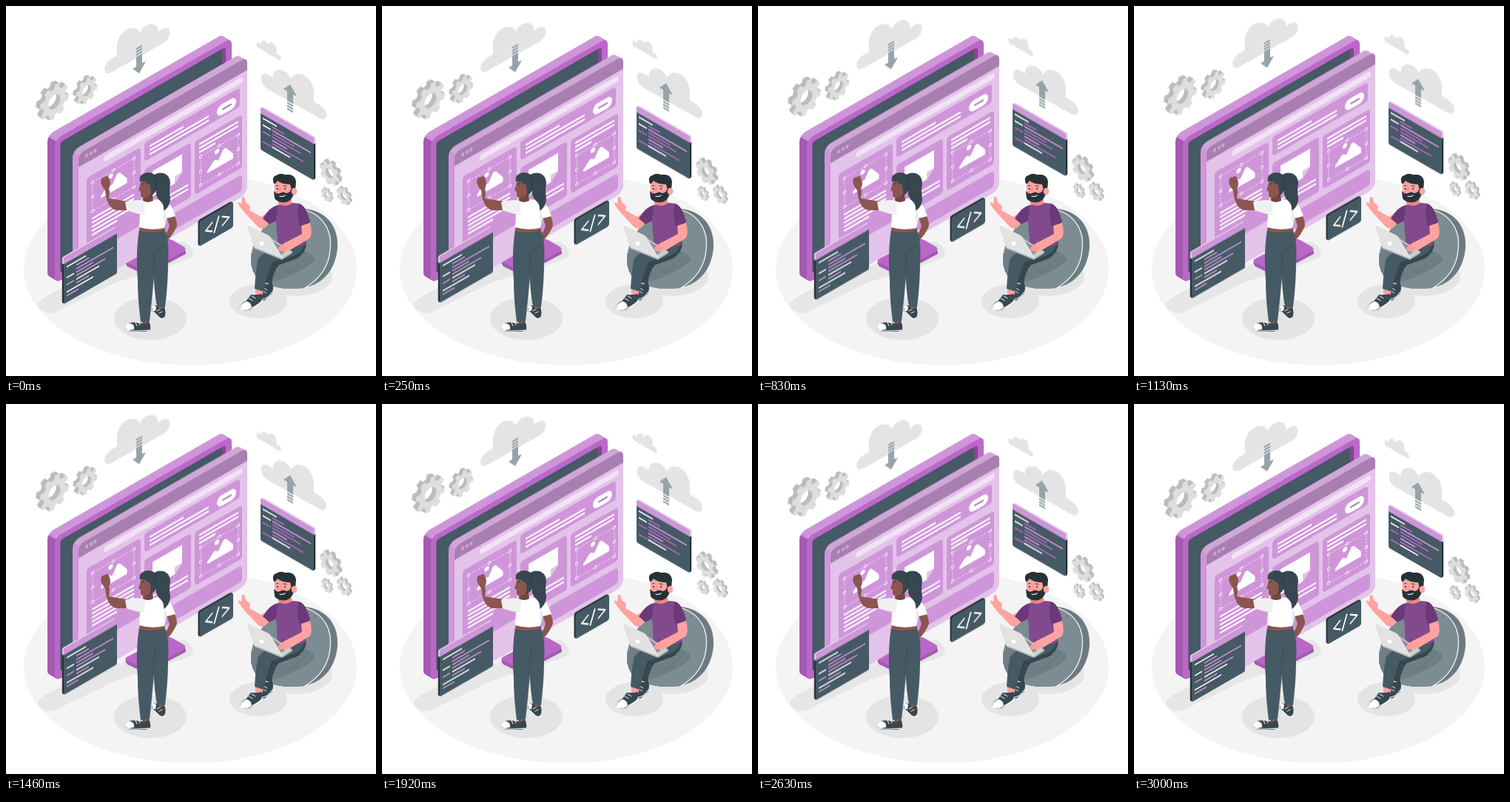
Animation of 500 by 500 pixels, one loop 3.04 s. Source, as an HTML page:

```html
<!DOCTYPE html>
<html lang="en">
<head>
<meta charset="utf-8">
<title>Web design team</title>
<style>
  html, body { margin: 0; width: 100%; height: 100%; overflow: hidden; background: #fff; }
  svg { display: block; width: 100%; height: 100%; }
</style>
</head>
<body>
<svg id="stage" viewBox="0 0 500 500"></svg>
<script>
const C = {
  purple: '#ba68c8', deep: '#a45ab0', lilac: '#cf95d9', pale: '#e3c3e9',
  slate: '#455a64', ink: '#263238', night: '#37474f', bar: '#a97fb1',
  cloud: '#e4e4e4', arrow: '#98a3a8', brown: '#8b5650', dusk: '#74463f',
  skin: '#ffa3a0', shirt: '#82498c'
};
const SLOPE = 0.577;

const path = (d, fill, extra = '') => `<path d="${d}" fill="${fill}" ${extra}/>`;
const line = (d, stroke, w = 1, extra = '') =>
  `<path d="${d}" fill="none" stroke="${stroke}" stroke-width="${w}" stroke-linecap="round" stroke-linejoin="round" ${extra}/>`;
const box = (x, y, x2, y2, r, fill, extra = '') =>
  `<rect x="${x}" y="${y}" width="${x2 - x}" height="${y2 - y}" rx="${r}" fill="${fill}" ${extra}/>`;
const oval = (x, y, rx, ry, fill) =>
  `<ellipse cx="${x}" cy="${y}" rx="${rx}" ry="${ry}" fill="${fill}"/>`;
const move = (x, y, body) => `<g transform="translate(${x} ${y})">${body}</g>`;
const bob = body => `<g class="bob">${body}</g>`;

// Upright isometric wall: up = -1 rises to the right, up = 1 falls.
const wall = (x, y, up, body) => `<g transform="matrix(1 ${up * SLOPE} 0 1 ${x} ${y})">${body}</g>`;

// Repeats a shape along a depth vector to make its sides.
function extrude(body, dx, dy, steps = 8) {
  let out = '';
  for (let i = steps; i > 0; i--) out += move(dx * i / steps, dy * i / steps, body);
  return out;
}

const edgeFill = (id, y, top, side) =>
  `<linearGradient id="${id}" gradientUnits="userSpaceOnUse" x1="0" y1="${y}" x2="0" y2="${y + 1}">
    <stop offset="0" stop-color="${top}"/><stop offset="1" stop-color="${side}"/></linearGradient>`;

const defs = `<defs>${edgeFill('screenEdge', 184, C.lilac, C.deep)}${edgeFill('pageEdge', 204, '#d0a6d7', C.lilac)}${edgeFill('panelEdge', 8, C.pale, C.ink)}</defs>`;

/* Floor */
const floor = oval(249, 355.5, 225, 130, '#f4f4f4')
  + path('M44 401Q46 396 76 381L238 318Q252 324 253 334Q253 340 244 343L150 373 66 414Q53 418 44 408Z', '#e6e6e6')
  + oval(195, 422.5, 49, 29, '#e4e4e4') + oval(341, 399, 39, 23, '#e4e4e4')
  + oval(392, 365, 49, 27, '#e4e4e4');

/* Sky */
const cloudShape = path('M137 91C130 89 132 76 147 69C150 67 151 66 150 62C148 47 156 32 168 30C175 29 179 32 181 36C184 28 193 22 200 25C205 27 206 32 205 36C211 29 220 27 221 33C223 41 217 48 211 51L145 88C142 90 139 91 137 91Z', C.cloud);
const arrowShape = path('M176 69 184 64.5V77L189 75 180 91 171 85 176 82Z', C.arrow)
  + [55, 59, 63].map(y => path(`M176 ${y + 2}l8-4.5v2.5l-8 4.5z`, C.arrow)).join('');
const sky = cloudShape + arrowShape
  + `<g transform="matrix(-1 0 0 1 566 62)">${cloudShape}</g>`
  + `<g transform="matrix(-.38 0 0 .39 422.5 37.6)">${cloudShape}</g>`
  + `<g transform="matrix(1 0 0 -1 204 197)">${arrowShape}</g>`;

/* Gears */
function gearPath(r) {
  const teeth = 8, step = 2 * Math.PI / teeth, pts = [];
  const at = (a, k) => `${(Math.cos(a) * r * k).toFixed(2)} ${(Math.sin(a) * r * k).toFixed(2)}`;
  for (let i = 0; i < teeth; i++) {
    const a = i * step + 0.2;
    pts.push(at(a - .25, .76), at(a - .16, 1), at(a + .16, 1), at(a + .25, .76));
  }
  const h = r * .4;
  return `M${pts.join('L')}ZM${h} 0A${h} ${h} 0 1 0 ${-h} 0A${h} ${h} 0 1 0 ${h} 0Z`;
}
function gear(x, y, r, up, depth) {
  const shape = fill => `<g transform="matrix(.866 ${up * .5} 0 1 ${x} ${y})">${path(gearPath(r), fill, 'fill-rule="evenodd"')}</g>`;
  return extrude(shape('#bcbcbc'), up * depth, -depth * SLOPE) + shape('#dedede');
}
const gears = gear(65.5, 129.5, 23, -1, 5.5) + gear(109, 114.5, 17, -1, 4)
  + gear(437, 226, 15.5, 1, 4) + gear(433, 255.5, 8.5, 1, 2) + gear(456, 257, 11, 1, 2.5);

/* Monitor */
const stand = path('M161 347L213 318Q219 314 225 318L240 327Q243 329 243 335L194 361Q188 363 183 361L164 352Z', C.deep)
  + path('M163 342L212 316Q219 313 226 317L240 325Q245 328 240 332L194 356Q189 358 184 356L164 347Q159 345 163 342Z', C.purple);
const slab = fill => wall(66, 0, -1, box(0, 180.7, 239, 375, 8, fill));
const monitor = stand + extrude(slab('url(#screenEdge)'), -10, -6, 10) + slab(C.purple)
  + wall(66, 0, -1, box(7.5, 188.5, 231, 366, 4, C.shirt) + box(7.5, 188.5, 226, 366, 4, C.slate));

/* Web page */
function picture(x, y, w) {
  const h = 39, dx = (w - 51) / 2;
  const knobs = [[0, 0], [w / 2, 0], [w, 0], [0, h], [w / 2, h], [w, h], [0, h / 2], [w, h / 2]];
  return move(x, y, `<rect width="${w}" height="${h}" fill="none" stroke="#fff" stroke-width=".6" stroke-dasharray="2.4 1.8"/>`
    + knobs.map(([a, b]) => box(a - 1.5, b - 1.5, a + 1.5, b + 1.5, 0, C.lilac, 'stroke="#fff" stroke-width=".7"')).join('')
    + move(dx, 0, path('M9 28V25L17 17Q19 15 21 17L24 19 30 9Q32 6.5 34.5 8.5L43 20Q44 21 44 23V28Z', '#fff') + oval(22, 6, 3.1, 3.1, '#fff')));
}
const texts = rows => rows.map(([x, x2, y]) => box(x, y - 1.2, x2, y + 1.2, 0, '#fff')).join('');
const sheet = fill => wall(98, 0, -1, box(0, 200, 228, 385, 9, fill));
const page = extrude(sheet('url(#pageEdge)'), -8, -4.6) + sheet(C.pale)
  + wall(98, 0, -1,
    path('M0 218V209Q0 200 9 200H219Q228 200 228 209V218Z', C.bar)
    + [11, 17, 22.5].map(x => oval(x, 208.6, 2.1, 2.4, '#cda9d4')).join('')
    + box(34, 223, 222, 231, 4, '#f2e2f5')
    + box(11, 239, 84, 345, 4, C.lilac) + picture(19, 249, 56)
    + texts([[18, 75, 298], [18, 75, 303.5], [18, 75, 309], [18, 75, 314.5], [18, 52, 320]])
    + box(89, 236, 218, 262, 4, C.lilac) + texts([[96, 142, 245], [96, 176, 250.5], [96, 176, 256]])
    + box(187, 244.5, 213, 259, 7, '#fff') + box(194, 250.7, 207, 253, 1, C.bar)
    + box(89, 272, 152, 346, 4, C.lilac)
    + path('M100 281H140V305L130 315H100Z', '#fff') + path('M140 305H130V315Z', C.pale)
    + texts([[96, 148, 327], [96, 148, 333]])
    + box(157, 274, 221, 346, 4, C.lilac)
    + texts([[163, 216, 281], [163, 216, 286.5], [163, 185, 292]]) + picture(165, 298.5, 51)
    + box(89, 355, 221, 377, 5, C.lilac));

/* Code panels */
const W = '#fff', P = C.purple, L = C.lilac;
const code = rows => rows.map(([c, x, x2, y]) => box(x, y - .9, x2, y + .9, 0, c)).join('');
function panel(x, y, up, h, rows) {
  const plate = fill => wall(x, y, up, box(0, 0, 72, h, 2, fill));
  return extrude(plate('url(#panelEdge)'), up * 2.2, -1.3, 4) + plate(C.slate)
    + wall(x, y, up, path('M0 8V2Q0 0 2 0H70Q72 0 72 2V8Z', L) + code(rows));
}
const panels = panel(344, 137, 1, 57, [
    [W, 3, 22, 13], [P, 16, 32, 17.5], [L, 16, 68, 22], [W, 3, 14, 22], [P, 16, 46, 26.5],
    [P, 3, 14, 31], [P, 16, 54, 31], [L, 16, 36, 35.5], [P, 16, 58, 40], [P, 3, 18, 44.5], [W, 16, 40, 44.5]])
  + panel(78, 341, -1, 62, [
    [W, 4, 30, 14], [L, 17, 34, 19], [L, 17, 67, 24], [W, 4, 14, 28.5], [L, 17, 40, 28.5],
    [L, 17, 56, 33], [L, 4, 14, 38], [W, 17, 48, 38], [L, 17, 34, 43], [W, 4, 40, 48], [L, 4, 20, 53]]);

const tagPlate = fill => wall(261.5, 291, -1, box(0, 0, 45.5, 34, 2.5, fill));
const tag = extrude(tagPlate(C.ink), -2, -1.2, 4) + tagPlate(C.slate)
  + wall(261.5, 291.5, -1, line('M17 11 8.5 17 17 23M26 8 20 26M31 11 40 17 31 23', '#fff', 2));

/* Woman */
const woman =
  // far arm
  path('M215 280L225 279Q231 288 231 297Q227 307 219 316L212 321 209 314 218 305 221 297Z', C.brown)
  // legs
  + path('M184 425H193V431H184ZM205 402H214V411H205Z', C.brown)
  + path('M198 302L214 301C220 315 220 330 219 347C219 370 217 390 215 407L204 406C201 390 200 375 199 355Z', C.slate)
  + path('M180 302C177 320 176 345 178 370C178 392 180 410 182 427L194 426C197 400 199 378 201 352L210 330 214 301Z', C.slate)
  + line('M199 358L201 331Q209 330 214 322', C.night, .8)
  // shoes
  + path('M197 406Q201 403 205 406L208 410 214 407Q217 415 214 421Q211 425 207 421L197 412Z', C.night)
  + path('M197 406Q201 403 203 407L202 412 198 412Z', '#fff')
  + line('M198 412L207 421Q211 424 214 421', '#fff', 1.1) + line('M204 412l4-2M207 415l4-2', '#fff', .9)
  + path('M162 431Q168 426 177 428L184 429Q189 431 193 426Q196 432 195 438L188 440H172Q161 440 161 434Z', C.night)
  + path('M161 434Q162 428 169 429Q174 431 173 437L166 438Q161 438 161 434Z', '#fff')
  + line('M163 438Q170 440 194 438', '#fff', 1.2) + line('M175 428l2 4M179 427l2 4', '#fff', 1)
  // torso
  + path('M181 296H214L215 303Q198 309 180 304Z', C.brown)
  + path('M184 263Q195 260 208 262Q223 266 225 274L229 284 217 287 214 300Q197 304 180 299L181 280Z', '#fff')
  + path('M216 276L217 287 215 295Q211 286 216 276Z', '#e8e8e8')
  // raised arm
  + path('M163 264L139 260Q141 250 139 247Q143 240 139 232Q137 228 134 231L130 232Q127 236 129 241Q131 246 134 249Q135 262 140 270Q145 276 151 276L166 276Z', C.brown)
  + path('M161 265Q174 261 188 263L187 282Q176 281 163 276Z', '#f0f0f0')
  + line('M130 236Q134 234 137 237', C.dusk, .6)
  // ponytail and head
  + path('M199 229Q205 224 213 226Q222 229 222 240Q220 250 222 260Q222 271 213 277Q214 269 209 264Q201 258 203 246Z', C.night)
  + path('M186 252L197 248 199 263Q192 267 185 263Z', C.dusk)
  + path('M183 235L181 243 179 249 182 251 182 257Q185 261 191 258L200 250 198 233Z', C.brown)
  + path('M181 237Q179 229 187 226Q196 223 203 230Q206 240 203 249Q200 255 195 257Q197 252 195 248L194 241Q190 241 188 237Z', C.night)
  + oval(193, 246, 2.6, 3.6, C.brown) + line('M203 231Q200 239 203 249', C.ink, .7)
  + line('M183 241l3-1', C.ink, .9);

/* Man */
const beanbag =
  path('M331 342C331 325 344 300 362 286C376 274 400 270 420 278C441 287 449 306 448 326C446 354 430 376 402 381C380 384 358 381 342 370Q331 360 331 342Z', '#6c7b82')
  + path('M331 342C331 325 344 300 362 286C376 274 394 272 406 276C432 285 441 307 438 330C436 352 424 369 404 381C380 384 358 381 342 370Q331 360 331 342Z', '#7d8c93')
  + path('M331 344Q334 326 347 312L400 330Q420 336 416 344Q394 365 352 375Q331 364 331 344Z', '#6f7e85')
  + line('M406 276C432 285 441 307 438 330C436 352 424 369 404 381', '#fff', 1.2)
  + line('M362 365Q390 357 407 340M380 360Q402 356 417 344', '#63737a', .8);

const man =
  // rear leg and shoe
  path('M350 372L359 376 357 385 347 381Z', C.skin)
  + path('M349 375Q354 378 359 373Q363 381 359 389L349 398Q343 397 344 389Z', C.night)
  + line('M346 396Q352 397 360 386', '#fff', 1) + line('M348 381l5 3M347 385l5 3', '#fff', .9)
  + path('M405 318Q408 330 394 341L369 350Q361 358 359 376L348 373Q350 350 359 338Z', C.night)
  // front leg and shoe
  + path('M337 380L348 384 346 393 337 391Z', C.skin)
  + path('M367 320L402 318Q404 331 388 338L359 347Q352 366 348 386L336 382Q337 358 341 341Q348 331 367 328Z', C.slate)
  + path('M331 390Q338 391 346 389Q348 396 342 402L331 410Q320 414 316 408Q316 403 325 398Z', C.night)
  + path('M325 399Q331 400 332 407Q323 413 316 409Q316 403 325 399Z', '#fff')
  + line('M317 410Q327 414 345 400', '#fff', 1.3) + line('M328 395l5 3M332 392l5 3', '#fff', 1)
  // gesturing arm
  + path('M366 282L351 299Q345 303 340 298L324 281 316 271 313 265 318 267 319 258 322 258 324 265 330 270 329 276 345 285 358 276Z', C.skin)
  + path('M367 269Q357 271 347 287L356 295 371 287Z', '#6c3978')
  // torso
  + path('M367 269Q380 264 396 267Q407 271 407 289L404 323Q386 327 367 321L365 290Z', C.shirt)
  + path('M396 267Q406 270 411 292Q404 299 397 297Q391 281 396 267Z', '#6c3978')
  // laptop
  + path('M337 327L355 312 387 332 373 342Z', '#cfcfcf')
  + path('M348 322L357 315 380 330 371 337Z', '#8b9499')
  + path('M326 299Q325 296 328 297L355 310Q358 312 359 315L374 340Q374 343 371 342L339 329Q336 328 335 325Z', '#e2e2e2')
  + path('M339 329L373 343 387 334V332L373 341 338 327Z', '#b5b5b5')
  + oval(345.5, 321, 3, 3, '#fff')
  // typing arm
  + path('M399 297L411 293Q415 309 410 314L387 328Q376 335 368 330Q367 326 375 321L400 308Z', C.skin)
  + line('M368 329L376 325M371 332L380 327', '#ed8583', .7)
  // head
  + path('M368 257L385 252 386 267Q377 273 368 267Z', '#ed8583')
  + path('M363 237Q373 231 387 237L390 249 384 261Q374 266 365 260Q362 248 363 237Z', C.skin)
  + path('M362 250Q366 255 370 253Q375 250 379 253Q385 252 386 245L390 250Q387 263 379 265Q368 267 363 260Z', C.ink)
  + path('M361 237Q360 230 365 229Q371 225 377 228Q390 226 392 237L391 249 386 249 384 241Q372 241 367 236Q364 241 362 240Z', C.ink)
  + oval(389.5, 250.5, 3.8, 4.8, C.skin)
  + line('M370 257Q374 258 377 256', '#fff', 1.2)
  + oval(367, 247, .9, 1.2, C.ink) + oval(377, 247, .9, 1.2, C.ink)
  + line('M365 243l3-.5M375 243l4 .5', C.ink, .9) + line('M371 245L369.5 250H372', '#ed8583', .8);

document.getElementById('stage').innerHTML = defs + floor + bob(sky + gears) + monitor
  + bob(page + panels + tag) + woman + beanbag + man;

/* Linear float: ten pixels up and back, then a short rest */
const LOOP = 3040;
for (const el of document.querySelectorAll('.bob')) {
  el.animate([
    { offset: 0, transform: 'translateY(0px)' },
    { offset: 1500 / LOOP, transform: 'translateY(-10px)' },
    { offset: 3000 / LOOP, transform: 'translateY(0px)' },
    { offset: 1, transform: 'translateY(0px)' }
  ], { duration: LOOP, iterations: Infinity, easing: 'linear' });
}
</script>
</body>
</html>
```
